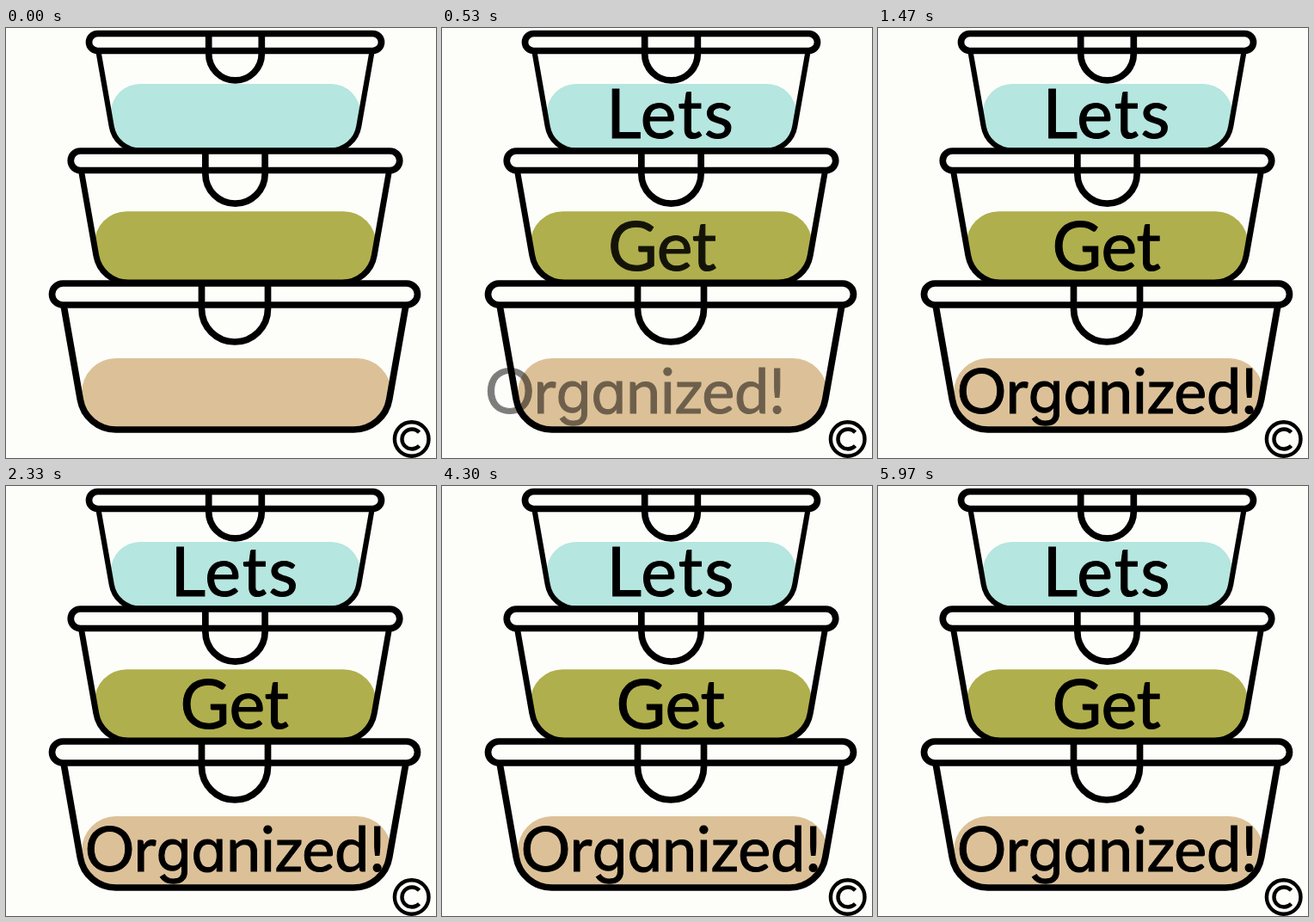
An HTML page for the animation above (6.01 s loop, 500 px wide and 500 px high).

```html
<!DOCTYPE html>
<html lang="en">
<head>
<meta charset="utf-8">
<title>Lets Get Organized!</title>
<style>
  @property --time { syntax: "<number>"; inherits: true; initial-value: 0; }

  html, body { margin: 0; width: 100%; height: 100%; overflow: hidden; background: #fdfefa; }

  /* The clock counts milliseconds at 30 pictures per second. */
  svg { display: block; width: 100vw; height: 100vh; animation: clock 6010ms steps(180) -5ms infinite; }
  @keyframes clock { from { --time: 0; } to { --time: 6010; } }

  .line { fill: none; stroke: #000; stroke-width: 7.7; }
  .line * { vector-effect: non-scaling-stroke; }

  /* Each word slides in with a cubic ease-out, 200 ms after the one before. */
  text {
    --left: calc(1 - clamp(0, (var(--time) - var(--delay)) / 650, 1));
    --rest: calc(var(--left) * var(--left) * var(--left));
    opacity: calc(1 - var(--rest));
    transform: translateX(calc(-84px * var(--rest)));
    font-family: Lato, "Open Sans", sans-serif;
    font-size: 79px;
    text-anchor: middle;
    stroke: #000;
    stroke-width: 1.1;
  }
  .lets { --delay: 0; letter-spacing: 2.1px; }
  .get { --delay: 200; letter-spacing: -.4px; }
  .organized { --delay: 400; font-size: 72px; letter-spacing: -.3px; }
  .round { font-family: Inter, sans-serif; font-size: 67px; font-feature-settings: "cv11"; }
</style>
</head>
<body>
<svg viewBox="0 0 500 500">
  <defs>
    <path id="body" d="M-199 25L-179.7 134.9A42 42 0 0 0 -138 170H138A42 42 0 0 0 179.7 134.9L199 25"/>
    <clipPath id="inside"><use href="#body"/></clipPath>
    <g id="box" class="line">
      <use href="#body"/>
      <rect x="-212.5" width="425" height="25" rx="12.5"/>
      <path d="M-38.5 0V29.5A38.5 38.5 0 0 0 38.5 29.5V0"/>
    </g>
  </defs>

  <g transform="translate(266.5 6.5) scale(.8)">
    <g clip-path="url(#inside)"><rect x="-181" y="73" width="363" height="97" rx="43" fill="#b5e6df"/></g>
    <use href="#box"/>
  </g>
  <g transform="translate(266.5 143) scale(.9)">
    <g clip-path="url(#inside)"><rect x="-182" y="78" width="364" height="92" rx="42" fill="#b0af4d"/></g>
    <use href="#box"/>
  </g>
  <g transform="translate(266 297)">
    <g clip-path="url(#inside)"><rect x="-178" y="87" width="360" height="83" rx="40" fill="#dcc198"/></g>
    <use href="#box"/>
  </g>

  <g fill="none" stroke="#000" stroke-width="4.4">
    <circle cx="471.7" cy="478" r="19.8"/>
    <path d="M480.5 470.3A11.5 11.5 0 1 0 480.5 485.7"/>
  </g>

  <text class="lets" x="266.5" y="128">Lets</text>
  <text class="get" x="265.5" y="281.5">Get</text>
  <text class="organized" x="266.5" y="448">Or<tspan class="round">ga</tspan>nized!</text>
</svg>
</body>
</html>
```
